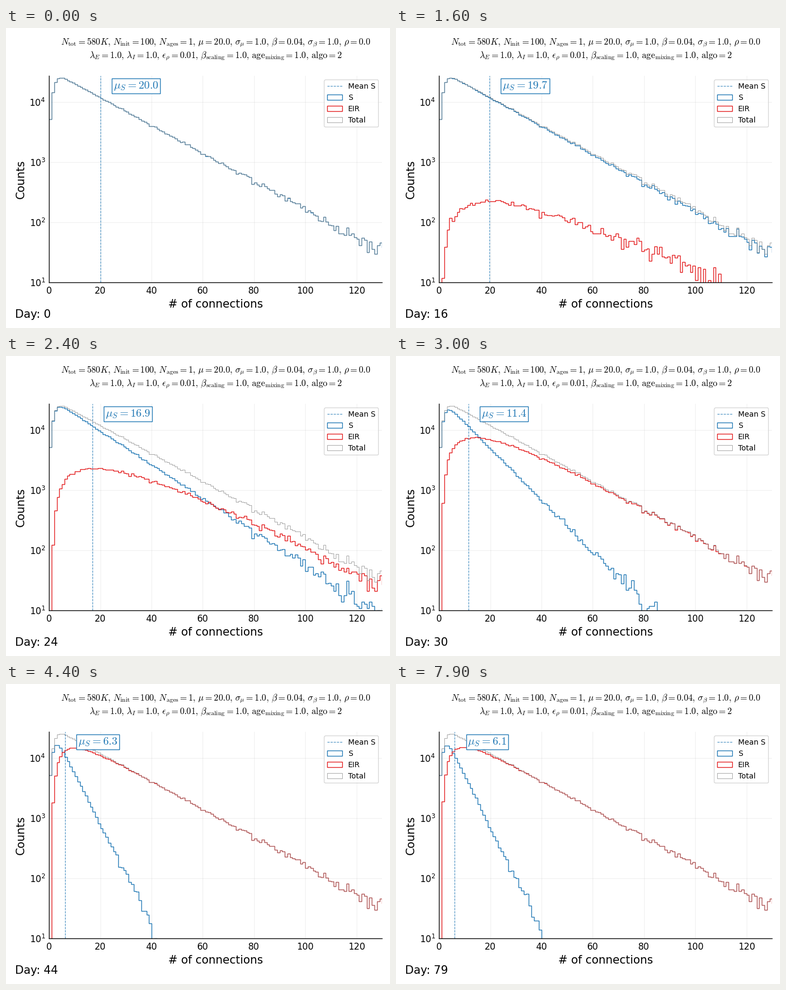
Animation, 715 px wide and 559 px high, one loop 8000 ms. Source, as a matplotlib script:

```python
import matplotlib.pyplot as plt
import numpy as np
from matplotlib.animation import FuncAnimation
from matplotlib.lines import Line2D
from matplotlib.patches import Patch

W, H, DPI = 715, 559, 100
LEFT, BOTTOM, AX_W, AX_H = 80.3, 84.6, 620, 385  # axes in pixels
DAYS = 80
BLUE, RED, GRAY = "#1f77b4", "#e31a1c", "gray"

plt.rcParams.update({"font.family": "DejaVu Sans", "mathtext.fontset": "cm"})
rng = np.random.default_rng(7)

# Connections per person: exponential tail with a dip near zero
K = np.arange(131)
TOTAL = rng.poisson(10 ** (4.531 - 0.0232 * K - 0.8125 * 0.43 ** K))
THRESHOLDS = [np.sort(rng.random(n)) for n in TOTAL]


def mean_s(c):
    """Mean connections left among S, scaled to start at 20."""
    mean = [np.average(K, weights=TOTAL * np.exp(-x * K)) for x in (0, c)]
    return 20 * mean[1] / mean[0]


# Infection pressure per connection: logistic, pinned by the mean of S
grid = np.linspace(0, 0.2, 600)
c24, c36, c44, c_end = np.interp(
    [16.9, 7.5, 6.3, 6.1], [mean_s(c) for c in grid][::-1], grid[::-1])
KNOT_DAYS = [0, 16, 24, 36, 44, 61]
share = np.array([8.6e-6, 0.00097, c24, c36, c44]) / c_end
KNOT_LOGITS = np.append(np.log(share / (1 - share)), 8)


def pressure(day):
    return c_end / (1 + np.exp(-np.interp(day, KNOT_DAYS, KNOT_LOGITS)))


def infected(c):
    p = 1 - np.exp(-c * K)
    return np.array([np.searchsorted(u, q) for u, q in zip(THRESHOLDS, p)])


fig = plt.figure(figsize=(W / DPI, H / DPI), dpi=DPI, facecolor="white")
ax = fig.add_axes([LEFT / W, BOTTOM / H, AX_W / W, AX_H / H])
ax.set_yscale("log")
ax.set_xlim(0, 130)
ax.set_ylim(10, 27380)
ax.spines[["top", "right"]].set_visible(False)
ax.spines[["left", "bottom"]].set_linewidth(1)
ax.tick_params(which="both", length=0, pad=5, labelsize=12)
ax.grid(True, which="major", color="#b0b0b0", alpha=0.2, lw=0.8)
ax.set_axisbelow(True)
ax.set_xlabel("# of connections", fontsize=15)
ax.set_ylabel("Counts", fontsize=15)

TITLE = [
    [r"N_\mathrm{tot} = 580K", r"N_\mathrm{init} = 100",
     r"N_\mathrm{ages} = 1", r"\mu = 20.0", r"\sigma_\mu = 1.0",
     r"\beta = 0.04", r"\sigma_\beta = 1.0", r"\rho = 0.0"],
    [r"\lambda_E = 1.0", r"\lambda_I = 1.0", r"\epsilon_\rho = 0.01",
     r"\beta_\mathrm{scaling} = 1.0", r"\mathrm{age}_\mathrm{mixing} = 1.0",
     r"\mathrm{algo} = 2"],
]
ax.set_title("\n".join("$" + r", \, ".join(terms) + "$" for terms in TITLE),
             fontsize=12, pad=24)


def step_hist(color, lw, zorder):
    return ax.stairs(TOTAL, np.arange(132), baseline=None, color=color,
                     lw=lw, zorder=zorder)


s_hist = step_hist(BLUE, 1, 2)
eir_hist = step_hist(RED, 1, 2.1)
step_hist(GRAY, 0.5, 2.2)

mean_style = dict(color=BLUE, ls="--", lw=0.8, alpha=0.85)
mean_line = ax.axvline(20, zorder=2.3, **mean_style)
mean_text = ax.text(0, 0.98, "", fontsize=15, color=BLUE, va="top",
                    transform=ax.get_xaxis_transform(),
                    bbox=dict(facecolor="white", edgecolor=BLUE, lw=1, pad=2))
day_text = fig.text(17 / W, 19 / H, "", fontsize=15, va="baseline")

handles = [Line2D([], [], **mean_style)]
handles += [Patch(facecolor="none", edgecolor=c, lw=lw)
            for c, lw in ((BLUE, 1), (RED, 1), (GRAY, 0.5))]
ax.legend(handles, ["Mean S", "S", "EIR", "Total"], loc="upper right",
          fontsize=10)


def update(day):
    c = pressure(day)
    eir = infected(c)
    s_hist.set_data(values=np.maximum(TOTAL - eir, 0.1))
    eir_hist.set_data(values=np.maximum(eir, 0.1))
    m = mean_s(c)
    mean_line.set_xdata([m, m])
    mean_text.set_x(m + 5)
    mean_text.set_text(rf"$\mu_S = {m:.1f}$")
    day_text.set_text(f"Day: {day}")
    return s_hist, eir_hist, mean_line, mean_text, day_text


anim = FuncAnimation(fig, update, frames=DAYS, interval=100, repeat=True,
                     repeat_delay=0, blit=False)
plt.show()
```
